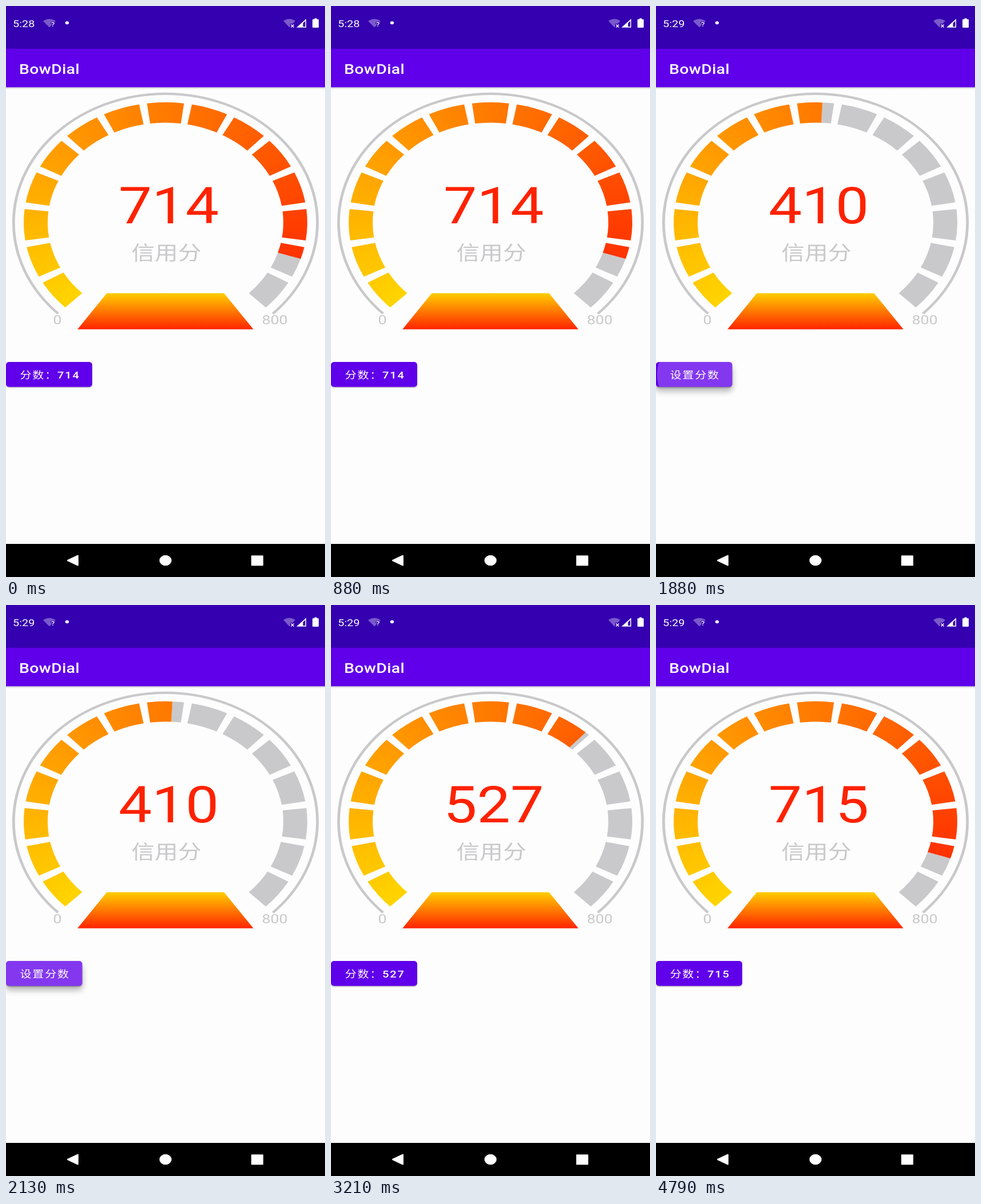
An HTML page with a canvas for the animation above (5040 ms loop, 559 px wide and 1001 px high).

```html
<!DOCTYPE html>
<html lang="zh">
<head>
<meta charset="utf-8">
<title>Score gauge</title>
<style>
html, body { margin: 0; width: 100%; height: 100%; overflow: hidden; background: #fdfdfd; }
canvas, svg { position: absolute; left: 0; top: 0; display: block; }
text { font-family: Roboto, "Noto Sans CJK SC", "Noto Sans CJK", sans-serif; white-space: pre; }
.cjk { font-weight: 400; }
.cut { stroke: #3400b0; stroke-width: 2.5; paint-order: stroke; }
</style>
</head>
<body>
<canvas id="gauge" width="559" height="600"></canvas>
<svg width="559" height="1001" viewBox="0 0 559 1001">
  <defs>
    <linearGradient id="fire" x2="0" y2="1">
      <stop stop-color="#ffce00"/><stop offset="1" stop-color="#ff2400"/>
    </linearGradient>
    <linearGradient id="shade" x2="0" y2="1">
      <stop stop-opacity=".18"/><stop offset="1" stop-opacity="0"/>
    </linearGradient>
    <filter id="soft" x="-20%" y="-40%" width="140%" height="200%"><feGaussianBlur stdDeviation="1.3"/></filter>
    <filter id="softer" x="-20%" y="-60%" width="140%" height="240%"><feGaussianBlur stdDeviation="6"/></filter>
    <clipPath id="face"><rect class="btn" y="624" height="43.700" rx="5.500" ry="4.700"/></clipPath>
  </defs>

  <!-- status bar and app bar -->
  <rect width="559" height="75.500" fill="#3400b0"/>
  <rect y="75" width="559" height="67.500" fill="#6000ea"/>
  <rect y="142.500" width="559" height="4" fill="url(#shade)"/>
  <g fill="#fff">
    <text id="clock" transform="translate(12 37) scale(1 .848)" font-size="19.900"></text>
    <path d="M65 26.500Q76 19 87 26.500L76 37.500Z" opacity=".35"/>
    <text class="cut" transform="translate(79 36.200) scale(1 .848)" font-size="13" font-weight="500">?</text>
    <ellipse cx="107" cy="29.500" rx="3.200" ry="2.700"/>
    <path d="M486 26Q496.500 19 507 26L496.500 37.500Z" opacity=".35"/>
    <path d="M498 31h8v8h-8Z" fill="#3400b0"/>
    <path d="M499.500 32.500l5 5m0-5l-5 5" stroke="#fff" stroke-width="1.500"/>
    <path d="M509 37.700L526 22.500V37.700Z"/>
    <path d="M520.500 30V36.300H524.500V26.300Z" fill="#3400b0"/>
    <path d="M538 23.300h2.500v-1.800h4v1.800h2.500q1 0 1 1v12.600q0 1-1 1h-9q-1 0-1-1v-12.600q0-1 1-1Z"/>
    <text transform="translate(23 118.500) scale(1 .848)" font-size="28.400" font-weight="500" letter-spacing=".36">BowDial</text>
  </g>

  <!-- gauge labels -->
  <text id="score" transform="translate(197.300 380.500) scale(1 .848)" font-size="104.200" fill="#ff2200"></text>
  <g fill="#c9c9cb" text-anchor="middle">
    <text transform="translate(281 445) scale(1 .848)" font-size="40.800">信用分</text>
    <text transform="translate(90 558) scale(1 .848)" font-size="26.800">0</text>
    <text transform="translate(471 558) scale(1 .848)" font-size="26.800">800</text>
  </g>
  <path d="M176.700 503.400H382L433.500 566.700H125.300Z" fill="url(#fire)"/>

  <!-- button -->
  <rect class="btn" y="626" height="43" rx="5.500" filter="url(#soft)" opacity=".3"/>
  <rect class="btn" id="lift" y="632" height="43" rx="5.500" filter="url(#softer)"/>
  <rect class="btn" y="624" height="43.700" rx="5.500" ry="4.700" fill="#6000ea"/>
  <g clip-path="url(#face)"><circle id="ripple" cx="72" cy="646" fill="#fff"/></g>
  <text transform="translate(24.400 653) scale(1 .848)" font-size="20.100" font-weight="500" letter-spacing="1.800" fill="#fff"><tspan id="label" class="cjk"></tspan><tspan id="digits"></tspan></text>

  <!-- navigation bar -->
  <rect y="943" width="559" height="58"/>
  <g fill="#fff" stroke="#fff" stroke-linejoin="round">
    <path d="M108 972L126 963.500V980.500Z" stroke-width="2"/>
    <ellipse cx="279.500" cy="972" rx="10.200" ry="8.800"/>
    <rect x="430.500" y="964" width="19.500" height="16.500" stroke-width="1.600"/>
  </g>
</svg>
<script>
const LOOP = 5040, FPS = 0.024, RESTART = 1380, RUN = 230, MAX = 800;
const CX = 279.5, CY = 379.6, SQUASH = 0.848;
const PARTS = 15, WIDTH = 15, PITCH = (270 - WIDTH) / (PARTS - 1);
const clicks = [
  { down: 1760, up: 2331.5, goal: 527 },
  { down: 3540, up: 3623, goal: 236 },
  { down: 3810, up: 3850, goal: 715 }
];
const $ = id => document.getElementById(id);
const ctx = $('gauge').getContext('2d');
const buttons = document.querySelectorAll('.btn');
const rad = deg => (deg + 135) * Math.PI / 180;
const clamp = x => Math.max(0, Math.min(1, x));
const ease = x => 0.5 - Math.cos(Math.PI * clamp(x)) / 2;

const sweep = ctx.createConicGradient(rad(0), 0, 0);
sweep.addColorStop(0, '#ffd400');
sweep.addColorStop(0.75, '#ff2000');
sweep.addColorStop(0.875, '#ff2000');
sweep.addColorStop(0.876, '#ffd400');

function block(start, end, fill) {
  ctx.beginPath();
  ctx.arc(0, 0, 248.5, rad(start), rad(end));
  ctx.arc(0, 0, 206.5, rad(end), rad(start), true);
  ctx.closePath();
  ctx.fillStyle = fill;
  ctx.fill();
}

function drawGauge(value) {
  ctx.setTransform(1, 0, 0, 1, 0, 0);
  ctx.clearRect(0, 0, 559, 600);
  ctx.setTransform(1, 0, 0, SQUASH, CX, CY);
  ctx.strokeStyle = '#c9c9cb';
  ctx.lineWidth = 4.8;
  ctx.beginPath();
  ctx.arc(0, 0, 266.2, rad(0), rad(270));
  ctx.stroke();
  const filled = value / MAX * PARTS;
  for (let i = 0; i < PARTS; i++) {
    const start = i * PITCH, mid = start + WIDTH * clamp(filled - i), end = start + WIDTH;
    if (mid < end) block(mid, end, '#c9c9cb');
    if (mid > start) block(start, mid, sweep);
  }
}

function stateAt(t) {
  const s = { value: 714, goal: 714, glow: 0, radius: 0 };
  if (t >= RESTART) { s.value = 410; s.goal = 0; }
  for (const c of clicks) {
    if (t >= c.up) {
      s.goal = c.goal;
      s.value = Math.floor(c.goal * ease((t - c.up) / RUN));
    }
    if (t >= c.down) {
      s.glow = 1 - clamp((t - c.up) / 145);
      s.radius = Math.min(170, 20 + (t - c.down) * 50 / 115);
    }
  }
  return s;
}

function render(now) {
  const t = Math.floor(now % LOOP * FPS + 0.1) / FPS;
  const s = stateAt(t);
  drawGauge(s.value);
  $('score').textContent = s.value;
  $('clock').textContent = t < RESTART ? '5:28' : '5:29';
  $('label').textContent = s.goal ? '分数：' : '设置分数';
  $('digits').textContent = s.goal || '';
  buttons.forEach(b => b.setAttribute('width', s.goal ? 151 : 133.5));
  $('lift').setAttribute('opacity', 0.3 * s.glow);
  $('ripple').setAttribute('r', s.radius);
  $('ripple').setAttribute('opacity', 0.22 * s.glow);
}

let origin;
function tick(now) {
  origin ??= now;
  render(now - origin);
  requestAnimationFrame(tick);
}
render(0);
requestAnimationFrame(tick);
</script>
</body>
</html>
```
